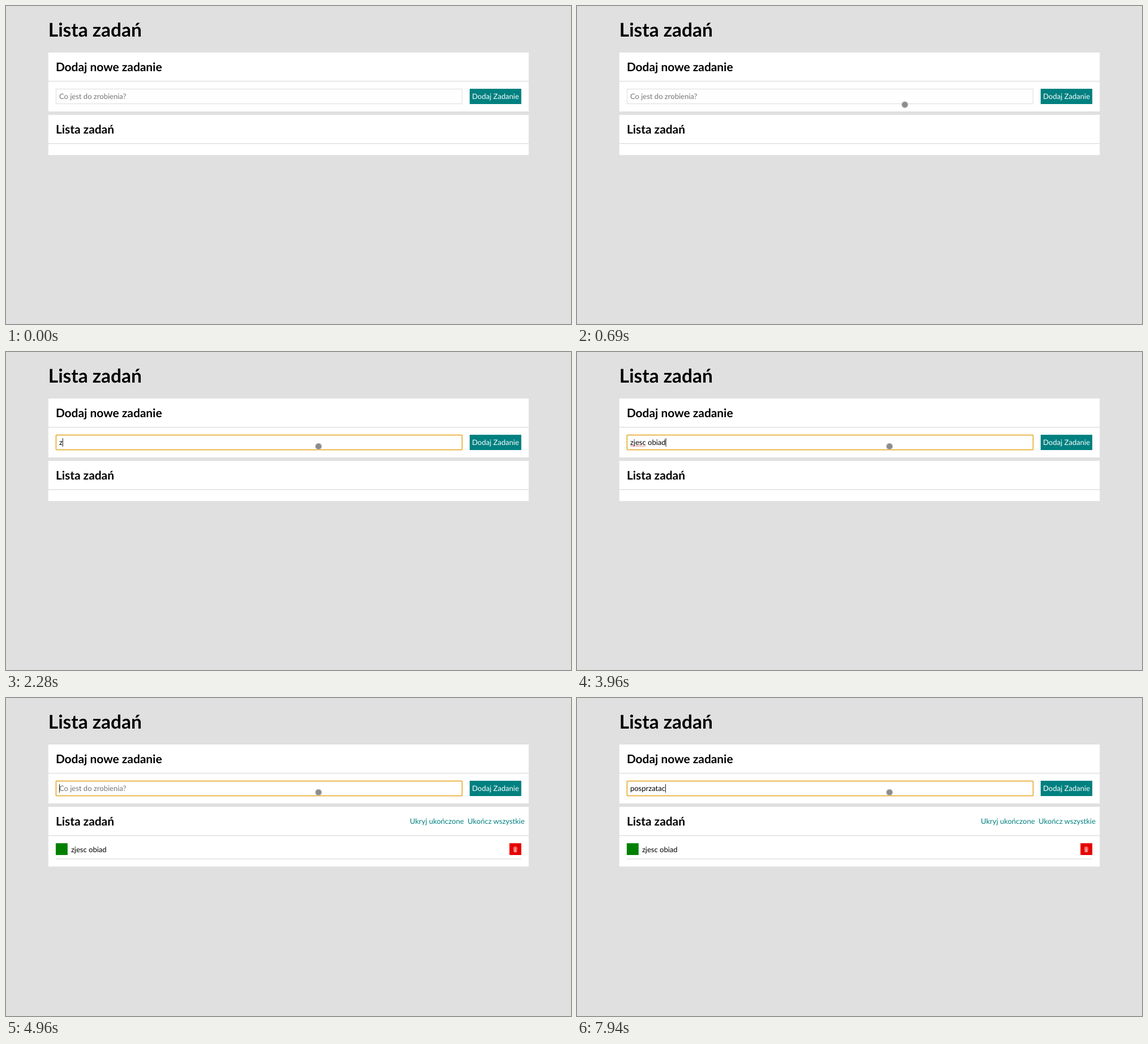
Recreate the animation shown at these times as an HTML page. Size 998x561 px, loop 8000 ms.

```html
<!DOCTYPE html>
<html lang="pl">
<head>
<meta charset="utf-8">
<title>Lista zadań</title>
<style>
  html, body { margin: 0; width: 100%; height: 100%; overflow: hidden; background: #e0e0e0; }
  svg { display: block; width: 998px; height: 561px; }
  text { font: 13.04px Lato, sans-serif; white-space: pre; text-rendering: geometricPrecision; }
  .h1 { font-size: 33.4px; font-weight: 700; }
  .h2 { font-size: 20.87px; font-weight: 700; }
  .card { fill: #fff; }
  .rule { fill: #ddd; }
  .teal { fill: teal; }
</style>
</head>
<body>
<svg viewBox="0 0 998 561">
  <text class="h1" x="74.8" y="53.6">Lista zadań</text>

  <rect class="card" x="74.8" y="82" width="848.5" height="104"/>
  <text class="h2" x="87.9" y="114.9">Dodaj nowe zadanie</text>
  <rect class="rule" x="74.8" y="132" width="848.5" height="1.3"/>
  <rect id="box" x="88.4" y="146.5" width="717.2" height="26" fill="#fff"/>
  <text id="hint" x="93.9" y="164.3" fill="#757575">Co jest do zrobienia?</text>
  <text id="typed" x="93.9" y="164.3"></text>
  <path id="spell" d="M94 166H121" stroke="#e66" stroke-width=".9"/>
  <rect id="caret" y="152" width=".9" height="15"/>
  <rect class="teal" x="819" y="146" width="91.2" height="27"/>
  <text x="864.7" y="164.3" text-anchor="middle" fill="#fff">Dodaj Zadanie</text>

  <rect id="list" class="card" x="74.8" y="192" width="848.5"/>
  <text class="h2" x="87.9" y="224.9">Lista zadań</text>
  <rect class="rule" x="74.8" y="242" width="848.5" height="1.3"/>
  <g id="task">
    <text class="teal" x="713.2" y="222.3">Ukryj ukończone</text>
    <text class="teal" x="815.3" y="222.3">Ukończ wszystkie</text>
    <rect x="87.9" y="256.2" width="20.9" height="20.8" fill="green"/>
    <text x="114.9" y="271.7">zjesc obiad</text>
    <rect x="889.3" y="256.2" width="20.9" height="20.8" fill="#e60000"/>
    <path d="M896 264H903M898.3 263.5V262.6H900.7V263.5M896.6 264.5L897.2 271.6H901.8L902.4 264.5M898.4 265V271M899.5 265V271M900.6 265V271"
          fill="none" stroke="#fbd5cd" stroke-width=".8"/>
    <rect class="rule" x="87.9" y="283.4" width="822.3" height="1.3"/>
  </g>

  <circle id="mouse" r="5.5" fill="#8c8c8c" stroke="#c4c4c4" stroke-width="1.2"/>
</svg>
<script>
const LOOP = 8000, FOCUS = 1080, ENTER = 4130;
const $ = id => document.getElementById(id);
const show = (id, on) => $(id).setAttribute('visibility', on ? 'visible' : 'hidden');
const set = (id, attrs) => { for (const k in attrs) $(id).setAttribute(k, attrs[k]); };

// Time of each key press; "<" deletes one letter.
const words = [
  ['zjesc obiad', [2280, 2440, 2570, 2700, 2900, 3230, 3400, 3490, 3660, 3760, 3960]],
  ['post<pt<rzatac', [5360, 5560, 5760, 5960, 6290, 6460, 6560, 6950, 7050, 7150, 7480, 7680, 7810, 7940]]
];

function typing(t) {
  const [keys, times] = words[t < ENTER ? 0 : 1];
  let text = '';
  times.forEach((at, i) => {
    if (t >= at) text = keys[i] === '<' ? text.slice(0, -1) : text + keys[i];
  });
  const last = Math.max(FOCUS, ...words.flatMap(w => w[1]).filter(at => at <= t));
  return { text, blinkOn: (t - last) % 1000 < 500 };
}

function moveMouse(t) {
  const left = 1 - Math.min(1, Math.max(0, (t - 160) / 730));
  const u = left ** 2.1;
  const curve = (a, b, c) => a * (1 - u) ** 2 + 2 * b * u * (1 - u) + c * u * u;
  set('mouse', { cx: curve(552, 760, 955), cy: curve(166.5, 215, 552) });
  show('mouse', t >= 160);
}

function draw(t) {
  const focused = t >= FOCUS, added = t >= ENTER;
  const { text, blinkOn } = typing(t);
  moveMouse(t);
  set('box', focused
    ? { stroke: '#e5a41c', 'stroke-width': 1.5, rx: 1 }
    : { stroke: '#ddd', 'stroke-width': 1, rx: 0 });
  $('typed').textContent = text;
  show('hint', !text);
  show('spell', t >= 3320 && !added);
  show('caret', focused && blinkOn);
  set('caret', { x: 93.9 + (text ? $('typed').getComputedTextLength() : 0) });
  set('list', { height: added ? 105.3 : 71 });
  show('task', added);
}

const start = performance.now();
function tick() {
  draw((performance.now() - start) % LOOP);
  requestAnimationFrame(tick);
}
tick();
</script>
</body>
</html>
```
